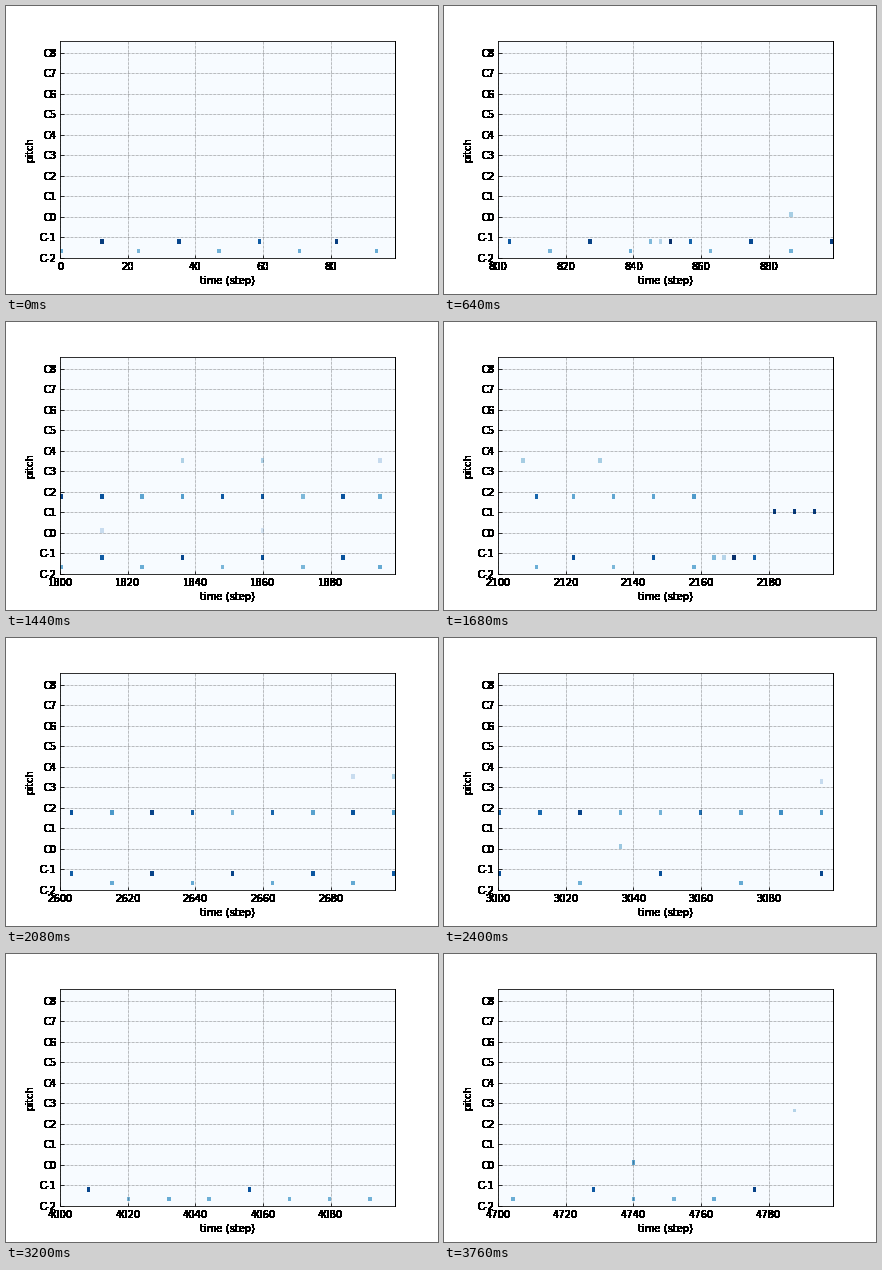
Recreate the animation shown at these times as a matplotlib script. Size 432 by 288 pixels, loop 3.84 s.

```python
import random

import matplotlib.pyplot as plt
import numpy as np
from matplotlib.animation import FuncAnimation

WINDOW, FRAMES, INTERVAL = 100, 48, 80
STEPS = WINDOW * FRAMES
HELD = {7, 14, 25, 28, 31}  # these ticks repeat the window before them

BEAT = 12
GROOVE, LATE, SPARSE, OUTRO = 1500, 3000, 3900, 4600  # section starts
ROLL_FIRST, ROLL_EVERY = 192, 660

# pitch rows covered by each part
PARTS = {
    "low": slice(3, 5),
    "mid": slice(8, 11),
    "ghost": slice(19, 22),
    "tom": slice(24, 27),
    "kick": slice(35, 38),
    "hat": slice(44, 47),
    "bell": slice(55, 57),
    "chime": slice(62, 65),
    "lead": slice(65, 68),
}


def drift(beat):
    """How far the players lag or rush, in steps."""
    return round(np.interp(beat, [0, 36, 96, 900, 1340, 2100, 2190, LATE],
                           [0, -1.1, -1.7, -1.3, 1.8, -1.4, -1.8, 0]))


def color_part(beat):
    """The rare accent voice of each section."""
    if beat < GROOVE or beat >= OUTRO:
        return "bell"
    if beat < LATE:
        return "lead"
    return "chime" if beat < SPARSE else "ghost"


def compose():
    rng = random.Random(24)
    song = np.zeros((128, STEPS))

    def play(part, beat, level):
        step = min(max(beat + drift(beat), 0), STEPS - 1)
        song[PARTS[part], step] = level

    for beat in range(0, STEPS, BEAT):
        since_roll = (beat - ROLL_FIRST) % ROLL_EVERY
        groove = GROOVE <= beat < LATE
        if groove and BEAT <= since_roll < 3 * BEAT:
            continue  # the kicks play alone here

        if beat < LATE:
            has_low, has_mid = beat % 24 == 0, beat % 24 == 12
        else:
            has_mid = beat % 48 == 24
            has_low = beat % 48 == 0 or not has_mid and rng.random() < .6
        if has_low:
            play("low", beat, rng.uniform(.46, .52))
        if has_mid:
            play("mid", beat, rng.uniform(.82, .95))

        if GROOVE <= beat < SPARSE and not (groove and since_roll == 0):
            play("hat", beat, rng.uniform(.45, .95))
        if rng.random() < .06:
            play("tom", beat, rng.uniform(.13, .55))
        if rng.random() < .05:
            part = color_part(beat)
            play(part, beat, .08 if part == "ghost" else rng.uniform(.2, .4))

    for roll in range(ROLL_FIRST, LATE, ROLL_EVERY):
        for offset, level in ((-6, .45), (-3, .3), (0, 1), (6, .8)):
            play("mid", roll + offset, level)
        if roll >= GROOVE:
            for offset in (64, 40):
                play("lead", roll - offset, .35)
            for offset in (12, 18, 24):
                play("kick", roll + offset, .95)
    return song


def solid(img, dpi):
    """Turn every touched pixel fully black."""
    out = np.zeros_like(img)
    out[..., 3] = img[..., 3] > 0
    return out, 0, 0


plt.rcParams.update({"font.family": "DejaVu Sans", "font.size": 10})
fig = plt.figure(figsize=(6, 4), dpi=72, facecolor="white")
ax = fig.add_axes([.125, .125, .775, .755])

song = compose()
image = ax.imshow(song[:, :WINDOW], cmap="Blues", vmin=0, vmax=1,
                  extent=(0, WINDOW - 1, 0, 127),
                  origin="lower", aspect="auto", interpolation="none")

ax.set_xticks(range(0, WINDOW, 20))
ax.set_yticks(range(0, 128, 12))
ax.set_yticklabels([f"C{octave}" for octave in range(-2, 9)],
                   agg_filter=solid)
ax.set_xlabel("time (step)", agg_filter=solid)
ax.set_ylabel("pitch", agg_filter=solid)
ax.tick_params(direction="in")
ax.grid(color="k", linestyle=":", linewidth=.5)
ax.spines["right"].set_agg_filter(solid)


def update(i):
    start = WINDOW * (i - (i in HELD))
    image.set_data(song[:, start:start + WINDOW])
    ax.set_xticklabels([str(start + x) for x in range(0, WINDOW, 20)],
                       agg_filter=solid)
    return [image]


anim = FuncAnimation(fig, update, frames=FRAMES, interval=INTERVAL,
                     repeat=True, repeat_delay=0, blit=False)
plt.show()
```
